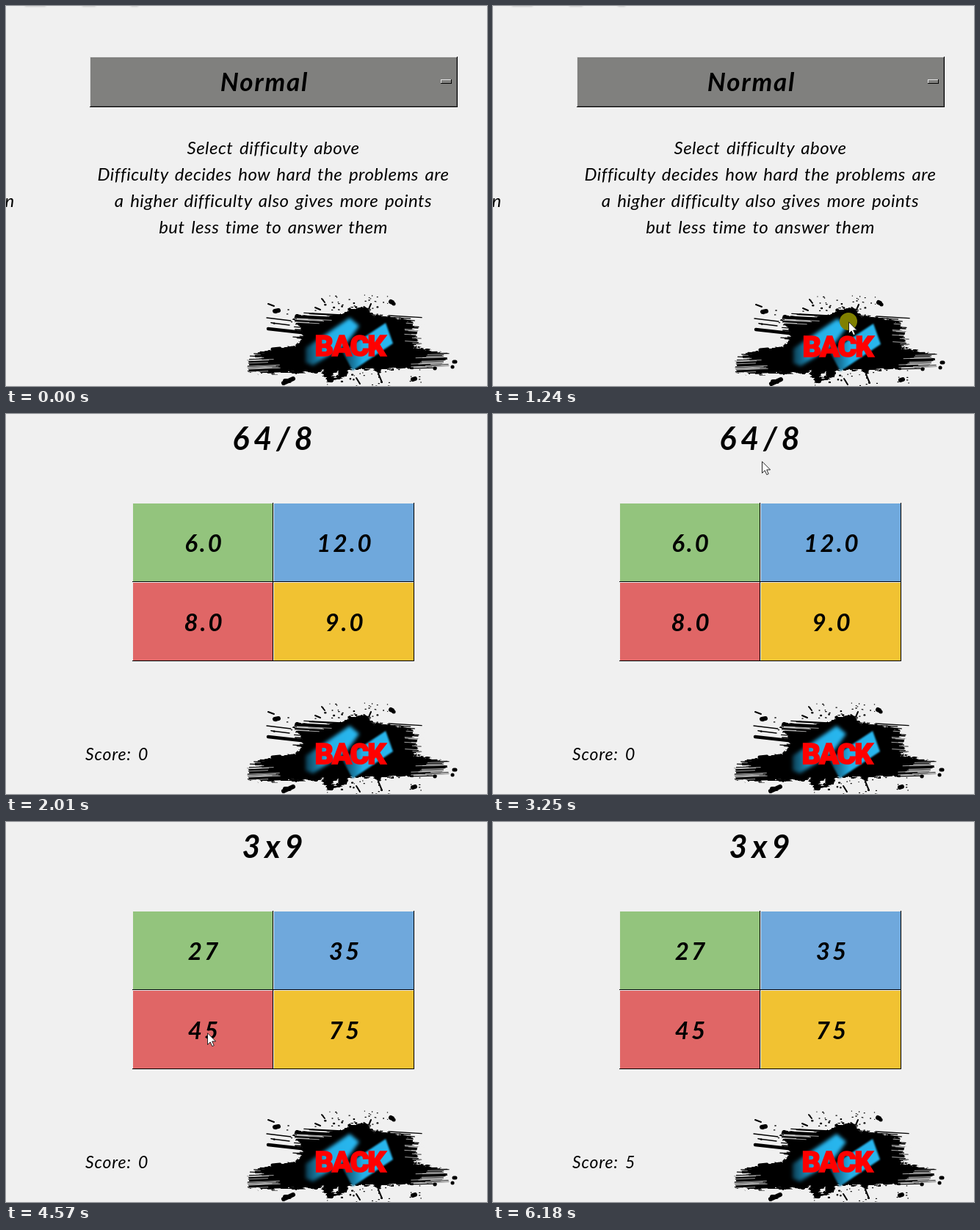
An HTML page that plays this animation: 655x518 px, repeating every 6.73 s.

```html
<!DOCTYPE html>
<html lang="en">
<head>
<meta charset="utf-8">
<title>Maths quiz</title>
<style>
html, body { margin: 0; width: 100%; height: 100%; overflow: hidden; background: #f0f0f0; }
svg { display: block; width: 655px; height: 518px; }
text { font-family: Lato, sans-serif; font-style: italic; font-variant-ligatures: none; text-anchor: middle; }
.help { font-size: 24px; letter-spacing: .5px; word-spacing: 2.5px; }
.choice { font-size: 35px; font-weight: 700; letter-spacing: 1.8px; }
.question { font-size: 43px; font-weight: 700; letter-spacing: 6px; }
.answer { font-size: 33px; font-weight: 700; letter-spacing: 3px; }
.score { font-size: 23px; letter-spacing: .8px; text-anchor: start; }
.label { font-family: Roboto, sans-serif; font-style: normal; font-weight: 900; fill: #f00; stroke: #f00; stroke-width: 1.6; }
.crisp { shape-rendering: crispEdges; }
.soft { filter: blur(1.2px); }
.misty { filter: blur(2.6px); }

.options, .menu, .game, .back, .press, .first, .second, .zero, .five, .down, #cursor {
  animation: 6730ms step-end infinite;
}
.options { animation-name: options; }
.menu { animation-name: menu; }
.game { animation-name: game; }
.back { animation-name: back; }
.press { animation-name: press; }
.down { animation-name: down; }
.first { animation-name: first; }
.second { animation-name: second; }
.zero { animation-name: zero; }
.five { animation-name: five; }
#cursor { animation-name: cursor; }

@keyframes options { 0% { opacity: 1 } 19.465%, 100% { opacity: 0 } }
@keyframes menu { 0% { opacity: 0 } 19.465% { opacity: 1 } 29.866%, 100% { opacity: 0 } }
@keyframes game { 0% { opacity: 0 } 29.866%, 100% { opacity: 1 } }
@keyframes back {
  0% { opacity: 1; transform: none }
  18.424% { opacity: 1; transform: translate(1px, 1px) }
  19.465% { opacity: 0; transform: none }
  29.866%, 100% { opacity: 1; transform: none }
}
@keyframes press {
  0% { opacity: 0 } 18.424% { opacity: 1 } 19.465% { opacity: 0 }
  66.716% { opacity: 1 } 67.904%, 100% { opacity: 0 }
}
@keyframes down { 0% { opacity: 0 } 66.716% { opacity: 1 } 67.904%, 100% { opacity: 0 } }
@keyframes first { 0% { opacity: 1 } 67.904%, 100% { opacity: 0 } }
@keyframes second { 0% { opacity: 0 } 67.904%, 100% { opacity: 1 } }
@keyframes zero { 0% { opacity: 1 } 70.133%, 100% { opacity: 0 } }
@keyframes five { 0% { opacity: 0 } 70.133%, 100% { opacity: 1 } }
@keyframes cursor {
  0% { transform: translate(570px, 560px) }
  1.04% { transform: translate(549px, 500px); animation-timing-function: steps(4) }
  5.646% { transform: translate(429px, 298px) }
  10.252% { transform: translate(417px, 286px); animation-timing-function: steps(5) }
  15.898% { transform: translate(484px, 430px) }
  19.465% { transform: translate(484px, 430px); animation-timing-function: steps(3) }
  22.882% { transform: translate(-60px, 250px) }
  34.621% { transform: translate(107px, 221px); animation-timing-function: steps(4) }
  39.227% { transform: translate(250px, 262px); animation-timing-function: steps(4) }
  43.833% { transform: translate(411px, 242px) }
  44.873% { transform: translate(425px, 205px); animation-timing-function: steps(3) }
  48.291% { transform: translate(366px, 64px) }
  50.817% { transform: translate(372px, 75px); animation-timing-function: steps(2) }
  53.076% { transform: translate(386px, 130px); animation-timing-function: steps(6) }
  59.881% { transform: translate(274px, 287px) }
  70.133% { transform: translate(268px, 300px); animation-timing-function: steps(4) }
  74.739% { transform: translate(209px, 381px) }
  81.574% { transform: translate(223px, 444px) }
  82.763% { transform: translate(223px, 560px) }
  84.992% { transform: translate(175px, 505px); animation-timing-function: steps(2) }
  87.369% { transform: translate(180px, 483px) }
  89.598% { transform: translate(245px, 487px) }
  90.713% { transform: translate(390px, 506px) }
  91.827%, 100% { transform: translate(460px, 560px) }
}
</style>
</head>
<body>
<svg viewBox="0 0 655 518">
  <defs>
    <filter id="rough" x="-5%" y="-5%" width="110%" height="110%" color-interpolation-filters="sRGB">
      <feTurbulence type="fractalNoise" baseFrequency=".09 .3" numOctaves="2" seed="4"/>
      <feDisplacementMap in="SourceGraphic" scale="9" xChannelSelector="R" yChannelSelector="G"/>
    </filter>
    <g id="splash" fill="none" stroke="#000" stroke-linecap="round">
      <g filter="url(#rough)">
        <path fill="#000" stroke="none" d="M74 46L66 39L68 31L100 35L133 31L140 24L157 21L168 23L173 32L205 36L228 42L226 50L236 55L230 62L238 68L228 75L244 79L266 83L274 92L266 101L190 107L150 106L100 110L22 112L3 109L5 93L20 86L40 79L72 73L78 60Z"/>
        <path fill="#000" fill-rule="evenodd" stroke="none" d="M104 112L116 104L140 106L138 114L128 121L112 123ZM120 111L129 109L127 114L118 117ZM174 105H188L182 113Z"/>
      </g>
      <path id="streaks" stroke-width="1.3"/>
      <path id="gaps" stroke="#f0f0f0" stroke-width=".7"/>
      <path id="specks" stroke-width="1.3"/>
      <path id="drops" stroke-width="2.4"/>
      <path stroke-width="4.5" d="M31 51L76 56"/>
      <path stroke-width="1.3" d="M29 36L62 40M36 43L60 46"/>
      <path stroke-width="6" d="M40 27L45 26M52 125L65 119M54 122L60 122M228 120L231 119M198 14L200 15"/>
      <path stroke-width="5" d="M284 96L286 96M282 103h.1M202 17h.1M37 79L47 78M258 105h.1"/>
      <path stroke-width="2" d="M171 17L168 24M104 10L108 15M181 112L186 124M151 118L156 126M95 22L102 25M31 17L39 20"/>
    </g>
    <linearGradient id="green"><stop stop-color="#176044"/><stop offset=".25" stop-color="#27ad73"/><stop offset="1" stop-color="#2cb379"/></linearGradient>
    <linearGradient id="blue"><stop stop-color="#0c3d52"/><stop offset=".4" stop-color="#24aee5"/><stop offset="1" stop-color="#29b8f0"/></linearGradient>
  </defs>

  <g class="options">
    <path class="soft" d="M26 -1H54M104 -1H122M170 -1H180" stroke="#bbb" stroke-width="3"/>
    <g class="crisp">
      <path fill="#80807e" d="M114 69H615V138H114Z"/>
      <path fill="none" stroke="#e3e3e3" d="M114.5 137V69.5H614"/>
      <path fill="none" stroke="#5c5c5c" d="M613.5 70V136.5H115"/>
      <path fill="none" stroke="#000" d="M614.5 69V137.5H114"/>
      <path fill="#80807e" stroke="#e3e3e3" d="M592.5 105.5V100.5H606.5V105.5Z"/>
      <path fill="none" stroke="#000" d="M606.5 100V105.5H592"/>
    </g>
    <text class="choice" x="352" y="116">Normal</text>
    <g class="help">
      <text x="364" y="202">Select difficulty above</text>
      <text x="364" y="238">Difficulty decides how hard the problems are</text>
      <text x="364" y="274">a higher difficulty also gives more points</text>
      <text x="364" y="310">but less time to answer them</text>
      <text x="5" y="274">n</text>
    </g>
  </g>

  <g class="menu">
    <path class="soft" d="M28 -1H62M72 -1H98M107 -1H128M138 -1H156M166 -1H192" stroke="#aaa" stroke-width="3.4"/>
    <use href="#splash" x="155" y="100"/>
    <path class="soft" fill="url(#green)" d="M249 190L300 163L348 141L352 163L308 179L258 199Z"/>
    <text class="label" x="298" y="186" font-size="30" letter-spacing="-1">OPTIONS</text>
    <use href="#splash" x="155" y="316"/>
    <path class="soft" fill="#d8c843" d="M281 362L325 384L331 421L281 400Z"/>
    <text class="label" x="301" y="402" font-size="41">QUIT</text>
  </g>

  <g class="game">
    <g id="tiles" class="crisp"></g>
    <g class="down crisp">
      <path fill="#f0f0f0" d="M172 229H364V337H172Z"/>
      <path fill="none" stroke="#777" d="M172.5 336V229.5H363"/>
      <text class="answer" x="271" y="297">8.0</text>
    </g>
    <text class="score" x="108" y="472">Score:</text>
    <text class="score zero" x="180" y="472">0</text>
    <text class="score five" x="180" y="472">5</text>
    <g id="first" class="first"></g>
    <g id="second" class="second"></g>
  </g>

  <g class="back">
    <use href="#splash" x="326" y="389"/>
    <g fill="url(#blue)">
      <path class="misty" d="M408 466L468 425L481 436L462 462L418 490L408 486Z"/>
      <path class="soft" d="M458 471L517 432L527 460L472 497Z"/>
    </g>
    <text class="label" x="468" y="477" font-size="39.5" letter-spacing="-2">BACK</text>
  </g>

  <g id="cursor">
    <circle class="press" r="12" fill="#808000"/>
    <path fill="#fff" stroke="#111" stroke-width=".9" d="M.5 .8V16.5L4.2 13L6.8 18.7L9.2 17.6L6.7 12H11.6Z"/>
  </g>
</svg>
<script>
const byId = id => document.getElementById(id);

let seed = 7;
const random = () => (seed = seed * 16807 % 2147483647) / 2147483647;
const between = (low, high) => low + (high - low) * random();
const repeat = (count, make) => Array.from({ length: count }, make).join('');
const line = (x1, y1, x2, y2) => `M${x1.toFixed(1)} ${y1.toFixed(1)}L${x2.toFixed(1)} ${y2.toFixed(1)}`;

// Dry-brush hairs: each starts inside the ink and ends at a ragged edge.
function hairs(count, inner, edge, yRange, slope) {
  return repeat(count, () => {
    const y = between(...yRange), end = between(...edge);
    return line(inner, y, end, y + (end - inner) * slope);
  });
}
const dots = (count, xs, ys) => repeat(count, () => {
  const x = between(...xs), y = between(...ys);
  return line(x, y, x + between(.1, 1.5), y);
});

byId('streaks').setAttribute('d',
  hairs(24, 195, [218, 242], [33, 72], .06) +
  hairs(14, 110, [64, 80], [33, 68], .06) +
  hairs(18, 225, [255, 279], [83, 105], -.02) +
  hairs(18, 60, [2, 22], [84, 108], .04) +
  hairs(8, 130, [66, 100], [30, 38], .05));
byId('gaps').setAttribute('d',
  hairs(9, 243, [215, 228], [38, 72], .06) +
  hairs(12, 280, [225, 255], [84, 102], -.03) +
  hairs(14, 2, [18, 48], [90, 110], -.04) +
  hairs(6, 68, [82, 120], [35, 48], .05));
byId('specks').setAttribute('d',
  dots(26, [85, 180], [6, 28]) + dots(30, [100, 200], [108, 138]) +
  dots(10, [155, 215], [3, 34]) + dots(8, [28, 70], [14, 48]) + dots(7, [200, 245], [106, 128]));
byId('drops').setAttribute('d', dots(7, [98, 185], [14, 27]) + dots(8, [115, 195], [112, 130]));

const columns = [172, 364], rows = [121, 229];
const colors = ['#93c47d', '#6fa8dc', '#e06666', '#f1c232'];
byId('tiles').innerHTML = colors.map((color, i) => {
  const x = columns[i % 2], y = rows[i >> 1];
  return `<path fill="${color}" d="M${x} ${y}h192v108h-192z"/>
    <path fill="none" stroke="#eee" d="M${x + .5} ${y + 107}v-106.5h191"/>
    <path fill="none" stroke="#000" d="M${x + 191.5} ${y}v107.5h-191.5"/>`;
}).join('');

function ask(id, question, answers) {
  byId(id).innerHTML = `<text class="question" x="366" y="49">${question}</text>` +
    answers.map((answer, i) =>
      `<text class="answer${answer === '8.0' ? ' first' : ''}" x="${columns[i % 2] + 98}" y="${rows[i >> 1] + 67}">${answer}</text>`).join('');
}
ask('first', '64/8', ['6.0', '12.0', '8.0', '9.0']);
ask('second', '3x9', ['27', '35', '45', '75']);
</script>
</body>
</html>
```
